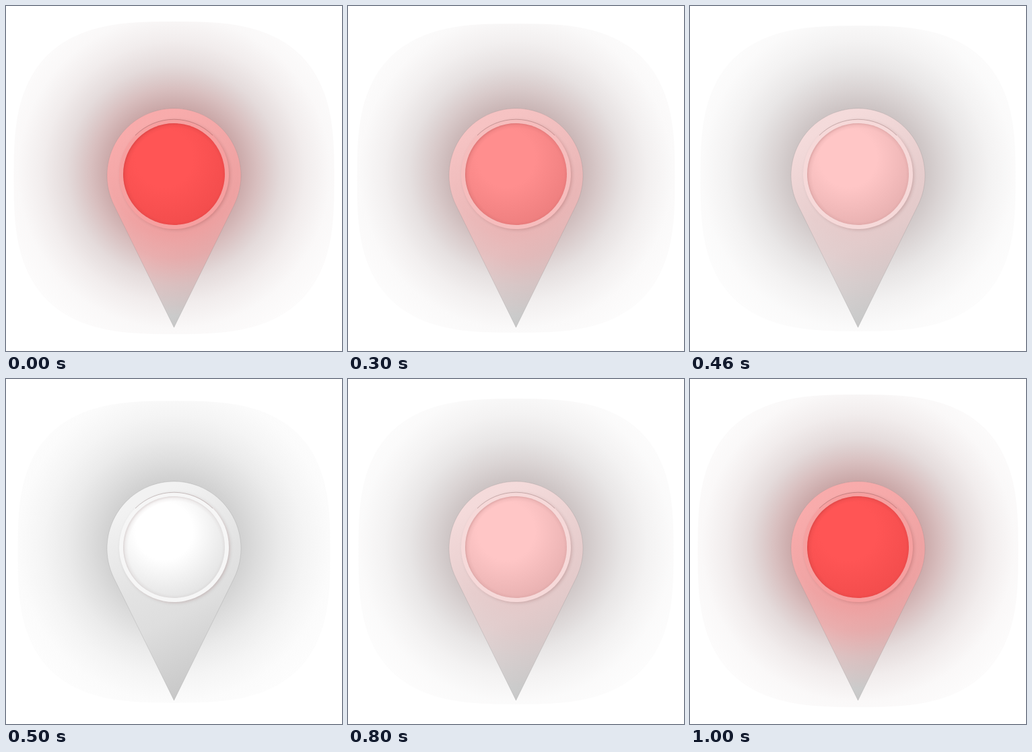
These frames come from a looping animation (499x512 px, 1.1 s). An HTML page:

```html
<!DOCTYPE html>
<html lang="en">
<head>
<meta charset="utf-8">
<title>Blinking map pin</title>
<style>
  html, body { margin: 0; width: 100%; height: 100%; overflow: hidden; background: #fff; }
  svg { display: block; width: 499px; height: 512px; }
</style>
</head>
<body>
<svg viewBox="0 0 499 512">
  <defs>
    <radialGradient id="glowFill" gradientUnits="userSpaceOnUse" cx="249.5" cy="247" r="290">
      <stop class="glow" offset="0.33" stop-opacity="1"/>
      <stop class="glow" offset="0.43" stop-opacity="0.72"/>
      <stop class="haze" offset="0.55" stop-opacity="0.42"/>
      <stop class="haze" offset="0.67" stop-opacity="0.22"/>
      <stop class="haze" offset="0.8" stop-opacity="0.08"/>
      <stop class="haze" offset="1" stop-opacity="0.01"/>
    </radialGradient>
    <linearGradient id="bodyFill" gradientUnits="userSpaceOnUse" x1="165" y1="200" x2="291" y2="453">
      <stop offset="0" stop-color="#f2f2f2"/>
      <stop offset="0.4" stop-color="#e3e3e3"/>
      <stop offset="0.62" stop-color="#dedede"/>
      <stop offset="1" stop-color="#c8c8c8"/>
    </linearGradient>
    <radialGradient id="tintFill" gradientUnits="userSpaceOnUse" cx="249.5" cy="245" r="215">
      <stop offset="0.44" stop-color="#ff5555" stop-opacity="0.45"/>
      <stop offset="0.6" stop-color="#ff5555" stop-opacity="0.35"/>
      <stop offset="0.78" stop-color="#ff5555" stop-opacity="0.16"/>
      <stop offset="1" stop-color="#ff5555" stop-opacity="0"/>
    </radialGradient>
    <radialGradient id="discFill" gradientUnits="userSpaceOnUse" cx="235" cy="226" r="106">
      <stop class="disc" offset="0.4"/>
      <stop class="rim" offset="1"/>
    </radialGradient>
    <radialGradient id="innerShade" gradientUnits="userSpaceOnUse" cx="251" cy="251" r="77">
      <stop offset="0.9" stop-color="#300" stop-opacity="0"/>
      <stop offset="0.96" stop-color="#300" stop-opacity="0.04"/>
      <stop offset="1" stop-color="#300" stop-opacity="0.13"/>
    </radialGradient>
    <filter id="soft" x="-20%" y="-20%" width="140%" height="140%">
      <feGaussianBlur stdDeviation="2.5"/>
    </filter>
    <path id="pin" d="M249.5 477L160.2 295.4A99.5 99.5 0 1 1 338.8 295.4Z"/>
    <clipPath id="pinClip"><use href="#pin"/></clipPath>
  </defs>

  <path id="glow" fill="url(#glowFill)"/>
  <use href="#pin" fill="url(#bodyFill)"/>
  <use id="tint" href="#pin" fill="url(#tintFill)"/>
  <use href="#pin" fill="none" stroke="#666" stroke-opacity="0.22" stroke-width="0.8"/>
  <g clip-path="url(#pinClip)">
    <circle cx="251.5" cy="251" r="81" fill="#400" fill-opacity="0.19" filter="url(#soft)"/>
  </g>
  <circle id="ring" cx="249.5" cy="249.5" r="81.5"/>
  <path d="M192 192A81.5 81.5 0 0 1 307 192" fill="none" stroke="#422" stroke-opacity="0.32" stroke-width="0.8"/>
  <circle cx="249.5" cy="249.5" r="75.5" fill="url(#discFill)"/>
  <circle cx="249.5" cy="249.5" r="75.5" fill="url(#innerShade)"/>
</svg>
<script>
  const LOOP = 1100;
  const $ = id => document.getElementById(id);
  const lerp = (a, b, k) => a + (b - a) * k;
  const mix = (a, b, k) => `rgb(${a.map((v, i) => Math.round(lerp(v, b[i], k)))})`;
  const grey = v => [v, v, v];

  function superellipse(cx, cy, rx, ry, n) {
    const curve = v => Math.sign(v) * Math.abs(v) ** (2 / n);
    let d = "";
    for (let i = 0; i < 120; i++) {
      const a = i / 120 * Math.PI * 2;
      const x = cx + rx * curve(Math.cos(a));
      const y = cy + ry * curve(Math.sin(a));
      d += (i ? "L" : "M") + x.toFixed(1) + " " + y.toFixed(1);
    }
    return d + "Z";
  }

  // Redness holds at each end and changes in three hard steps between.
  function redness(t) {
    if (t < 300) return 1;
    if (t < 500) return t < 400 ? 2 / 3 : 1 / 3;
    if (t < 800) return 0;
    return Math.min(3, Math.floor((t - 700) / 100)) / 3;
  }

  function paintStops(name, color) {
    document.querySelectorAll("stop." + name)
      .forEach(s => s.setAttribute("stop-color", color));
  }

  function draw(k) {
    paintStops("disc", mix(grey(255), [255, 85, 85], k));
    paintStops("rim", mix(grey(226), [242, 76, 76], k));
    paintStops("glow", mix(grey(92), [142, 68, 68], k));
    paintStops("haze", mix(grey(92), [122, 76, 76], k));
    $("ring").setAttribute("fill", mix(grey(246), [246, 160, 160], k));
    $("tint").setAttribute("opacity", k);
    $("glow").setAttribute("opacity", lerp(0.29, 0.47, k));
    $("glow").setAttribute("d", superellipse(
      249.5, lerp(256.5, 255, k), lerp(232, 238, k), lerp(224, 232, k), 2.9));
  }

  let shown = -1;
  function tick(now) {
    const k = redness(now % LOOP);
    if (k !== shown) draw(shown = k);
    requestAnimationFrame(tick);
  }
  tick(performance.now());
</script>
</body>
</html>
```
